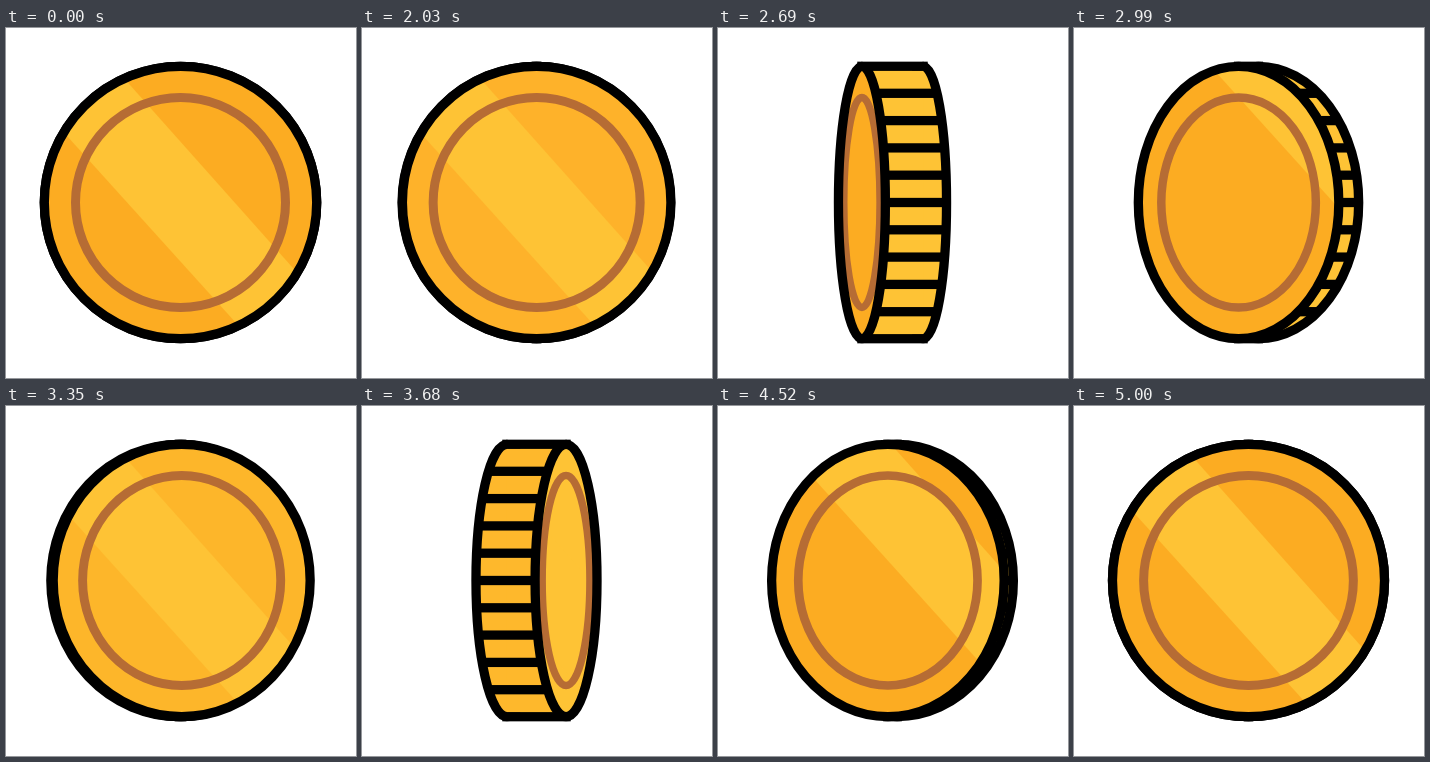
An HTML page without scripts for the animation above (5030 ms loop, 350x350 px).

```html
<!DOCTYPE html>
<html lang="en">
<head>
<meta charset="utf-8">
<title>Spinning coin</title>
<style>
@property --a { syntax: "<angle>"; inherits: true; initial-value: 0deg; }
@property --t { syntax: "<length>"; inherits: true; initial-value: 32px; }
@property --m { syntax: "<length>"; inherits: true; initial-value: 0px; }
@property --gold { syntax: "<color>"; inherits: true; initial-value: #fcac22; }
@property --edge { syntax: "<color>"; inherits: true; initial-value: #fec335; }

html, body { margin: 0; width: 100%; height: 100%; overflow: hidden; background: #fff; }

svg {
  display: block;
  width: 100%;
  height: 100%;
  /* a: turn, t: half thickness, d: face offset, e: its size */
  --r: 136.2px;
  --pen: 9.3px;
  --s: sin(var(--a));
  --c: cos(var(--a));
  --d: calc(var(--t) * var(--s) * var(--s) * var(--s));
  --e: max(var(--d), -1 * var(--d));
  --rx: calc(var(--r) * var(--c));
  animation: spin 5030ms linear infinite;
}

.line { stroke: #000; stroke-width: var(--pen); }
.disc { rx: var(--rx); ry: var(--r); }
.back { cx: calc(-1 * var(--d)); fill: var(--edge); }
.face { cx: var(--d); fill: var(--gold); }
.side, .fill {
  x: calc(-1 * var(--e));
  y: calc(-1 * var(--h));
  width: calc(2 * var(--e));
  height: calc(2 * var(--h));
  fill: var(--edge);
}
.side { --h: var(--r); }
.fill { --h: calc(var(--r) - var(--pen) / 2); }

.teeth rect {
  --w: calc(var(--e) + var(--rx) * cos(asin(var(--k) * 0.2)));
  x: calc(-1 * var(--w));
  width: calc(2 * var(--w));
  y: calc(var(--k) * 27.3px - var(--pen) / 2);
  height: var(--pen);
}

.ring {
  cx: var(--d);
  rx: calc(105px * var(--c));
  ry: 105px;
  fill: none;
  stroke: #b66c34;
  stroke-width: calc(7px + 2px * var(--c));
}
.outline { fill: none; }
.shine { fill: #fec335; transform: translateY(var(--m)); }

@keyframes spin {
  0%, 40.35% { --a: 0deg; --m: 0px; --gold: #fcac22; --edge: #fcac22; }
  40.355% { --a: 9.5deg; --gold: #feb22a; }
  45.7% { --gold: #fec335; }
  51.88% { --a: 89.5deg; --m: 0px; --gold: #fec335; --edge: #fec335; }
  51.89% { --a: -89.5deg; --m: -162px; --gold: #fcac22; }
  53.48% { --a: -80.2deg; }
  59.44% { --a: -42.8deg; --m: -154px; }
  61.23% { --a: -27.8deg; }
  64.4% { --edge: #fec335; }
  64.41% { --a: 0deg; --m: 0px; --gold: #fcac22; --edge: #fcac22; }
  69.6% { --gold: #fec335; }
  73.16% { --a: 76.7deg; --edge: #feb82c; }
  74.84% { --a: 89.5deg; --m: 0px; --t: 32px; --gold: #fec335; --edge: #fec335; }
  74.85% { --a: -89.5deg; --m: -162px; --gold: #fcac22; }
  82.7% { --a: -60deg; --m: -152px; --t: 33.8px; }
  93.44% { --a: -17.2deg; --m: -35px; --t: 32px; }
  99.4% { --a: -3deg; --m: 0px; }
  100% { --a: 0deg; --m: 0px; --gold: #fcac22; --edge: #fec335; }
}
</style>
</head>
<body>
<svg viewBox="0 0 350 350">
  <defs>
    <clipPath id="rim"><ellipse class="disc face"/></clipPath>
  </defs>
  <g transform="translate(174.5 174.5)">
    <rect class="side line"/>
    <ellipse class="disc back line"/>
    <rect class="fill"/>
    <g class="teeth">
      <rect style="--k:-4"/>
      <rect style="--k:-3"/>
      <rect style="--k:-2"/>
      <rect style="--k:-1"/>
      <rect style="--k:0"/>
      <rect style="--k:1"/>
      <rect style="--k:2"/>
      <rect style="--k:3"/>
      <rect style="--k:4"/>
    </g>
    <ellipse class="disc face"/>
    <g clip-path="url(#rim)">
      <path class="shine" d="M-140-218 140 96.5V214L-140-96Z"/>
    </g>
    <ellipse class="ring"/>
    <ellipse class="disc face line outline"/>
  </g>
</svg>
</body>
</html>
```
